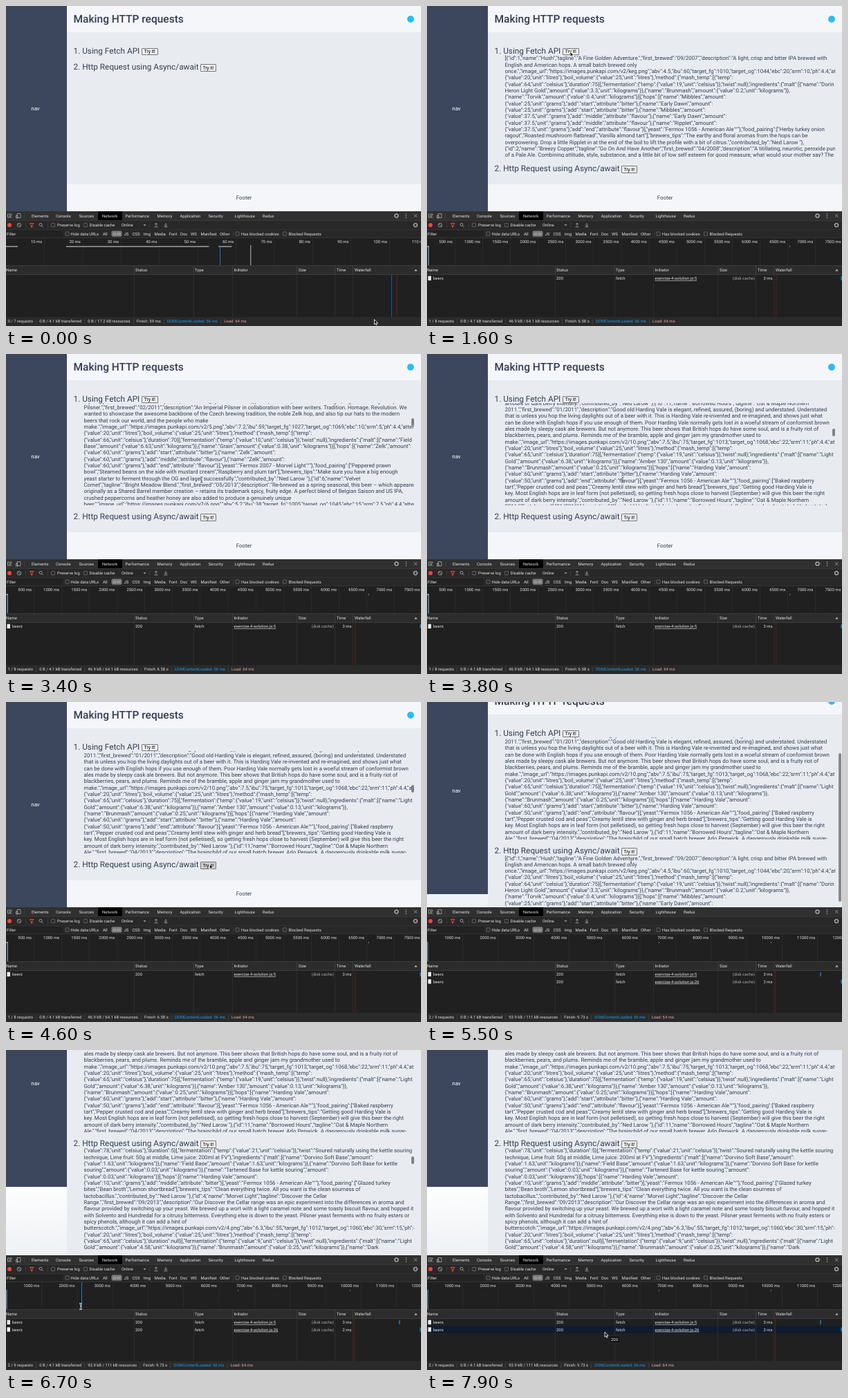
An HTML page that plays this animation: 600x463 px, repeating every 8 s.

```html
<!DOCTYPE html>
<html lang="en">
<head>
<meta charset="utf-8">
<title>Making HTTP requests</title>
<style>
html, body { margin: 0; width: 100%; height: 100%; overflow: hidden; background: #222; }
#stage { position: relative; width: 600px; height: 463px; overflow: hidden; font-family: Roboto, sans-serif; text-rendering: geometricPrecision; }
#stage div, #stage svg, button { position: absolute; }
#page { width: 600px; height: 297px; overflow: hidden; background: linear-gradient(#fff 190px, #eef1f5 297px); color: #333c52; font-size: 7.87px; }
#doc { width: 600px; height: 397px; }
#nav { width: 88px; height: 297.5px; line-height: 297px; text-align: center; text-indent: -3px; background: #3c475e; color: #fff; }
#head { left: 88px; width: 512px; height: 38px; background: #f5f6fa; }
#title { left: 97.5px; top: 9px; font: 500 15.5px/20px Roboto, sans-serif; }
#dot { left: 580px; top: 14px; width: 10px; height: 10px; border-radius: 50%; background: #2bbcf7; }
#main { left: 88px; top: 38px; width: 512px; height: 220px; background: #e8ecf1; }
#foot { left: 88px; top: 258px; width: 512px; height: 39px; line-height: 39px; text-align: center; background: #f5f6fa; }
.item { left: 97.5px; top: 57.6px; font-size: 11.8px; line-height: 14px; white-space: pre; }
button { box-sizing: border-box; width: 23.5px; height: 10.5px; padding: 0; border: 1px solid #767676; border-radius: 1px; background: #efefef; color: #000; font: 6.5px/8px "Liberation Sans", Arial, sans-serif; }
.out { left: 112.5px; top: 71.3px; width: 477.5px; height: 147.5px; overflow: hidden; display: none; }
.out div { white-space: pre; line-height: 9.33px; }
.thumb { left: 585.5px; width: 4px; height: 11px; border-radius: 2px; background: #7f8287; }
#pageThumb { left: 595px; top: 74px; width: 4px; height: 215px; border-radius: 2px; background: #86898e; }
.status { top: 450px; left: 0; width: 600px; height: 13px; display: flex; align-items: center; background: #2a2a2a; color: #ddd; font-size: 5.95px; white-space: nowrap; }
.status span { padding: 0 4.2px 0 4px; border-right: .5px solid #3c3c3c; }
.status span:first-child { padding-left: 2.5px; }
.status span:last-child { border: 0; }
svg text { font: 5.95px Roboto, sans-serif; fill: #e2e2e2; }
</style>
</head>
<body>
<div id="stage">
  <div id="page">
    <div id="doc">
      <div id="nav">nav</div>
      <div id="head"></div>
      <div id="title">Making HTTP requests</div>
      <div id="dot"></div>
      <div id="main"></div>
      <div id="foot">Footer</div>
      <div class="item">1. Using Fetch API</div>
      <button style="left:196px;top:60.8px">Try it!</button>
      <div class="out"><div></div></div>
      <div id="second" style="top:0;left:0">
        <div class="item" style="top:81px">2. Http Request using Async/await</div>
        <button style="left:280.7px;top:84.4px">Try it!</button>
        <div class="out" style="top:94.5px"><div></div></div>
        <div class="thumb"></div>
      </div>
      <div class="thumb" id="thumb1"></div>
    </div>
    <div id="pageThumb"></div>
  </div>
  <svg id="tools" width="600" height="463"></svg>
  <div id="statuses"></div>
  <svg id="pointer" width="600" height="463"></svg>
</div>
<script>
const $ = s => document.querySelector(s), $$ = s => [...document.querySelectorAll(s)];

// Response text, already broken into lines
const LINE = 9.33, VIEW = 147.5, TOTAL = 375;
const temp = n => `{"value":${n},"unit":"celsius"}`;
const grams = (n, part, use) => `{"value":${n},"unit":"grams"},"add":"${part}","attribute":"${use}"}`;
const kilos = n => `{"value":${n},"unit":"kilograms"}}`;
const image = (word, file, abv, ibu, fg, og, ebc, srm) => `${word}.","image_url":"https://images.punkapi.com/v2/${file}.png","abv":${abv},"ibu":${ibu},"target_fg":${fg},"target_og":${og},"ebc":${ebc},"srm":${srm},"ph":4.4,"attenuation_level":75,"volume":`;
const volume = '{"value":20,"unit":"litres"},"boil_volume":{"value":25,"unit":"litres"},"method":{"mash_temp":[{"temp":';
const mash = (a, time, b, malt) => `${temp(a)},"duration":${time}}],"fermentation":{"temp":${temp(b)}},"twist":null},"ingredients":{"malt":[{"name":"${malt}`;
const next = hop => `,{"name":"${hop}","amount":`;
const by = '"contributed_by":"Ned Larow "},';

const blocks = {
  0: [
    '[{"id":1,"name":"Hush","tagline":"A Fine Golden Adventure.","first_brewed":"09/2007","description":"A light, crisp and bitter IPA brewed with',
    'English and American hops. A small batch brewed only',
    image('once', 'keg', 4.5, 60, 1010, 1044, 20, 10),
    volume,
    mash(64, 75, 19, 'Dorin'),
    `Heron Light Gold","amount":${kilos(3.3)},{"name":"Brunmash","amount":${kilos(0.2)},`,
    `{"name":"Torvik","amount":${kilos(0.4)}],"hops":[{"name":"Mibbles","amount":`,
    grams(25, 'start', 'bitter') + next('Early Dawn'),
    grams(25, 'start', 'bitter') + next('Mibbles'),
    grams(37.5, 'middle', 'flavour') + next('Early Dawn'),
    grams(37.5, 'middle', 'flavour') + next('Ripplet'),
    grams(37.5, 'end', 'flavour') + '],"yeast":"Fermox 1056 - American Ale™"},"food_pairing":["Herby turkey onion',
    'ragout","Roasted mushroom flatbread","Vanilla almond tart"],"brewers_tips":"The earthy and floral aromas from the hops can be',
    'overpowering. Drop a little Ripplet in at the end of the boil to lift the profile with a bit of citrus.",' + by,
    '{"id":2,"name":"Breezy Copper","tagline":"Go On And Have Another","first_brewed":"04/2008","description":"A titillating, neurotic, peroxide punk',
    'of a Pale Ale. Combining attitude, style, substance, and a little bit of low self esteem for good measure; what would your mother say? The',
    'seductive lure of the sassy passion fruit hop proves too much to resist. All that is even before we get onto the fact that there are no',
    'additives, preservatives, pasteurization or strings attached. All wrapped up with the customary MaltElk bite and imaginative',
    'twist.'],
  33: [
    `${temp(78)},"duration":5}],"fermentation":{"temp":${temp(21)}},"twist":"Soured naturally using the kettle souring`,
    'technique, Lime fruit: 50g at middle, Lime juice: 200ml at FV"},"ingredients":{"malt":[{"name":"Dorvino Soft Base","amount":',
    `${kilos(1.63)},{"name":"Field Base","amount":${kilos(1.63)},{"name":"Dorvino Soft Base for kettle`,
    `souring","amount":${kilos(0.03)},{"name":"Tartened Base for kettle souring","amount":`,
    `${kilos(0.03)}],"hops":[{"name":"Harding Vale","amount":`,
    grams(10, 'middle', 'bitter') + '],"yeast":"Fermox 1056 - American Ale™"},"food_pairing":["Glazed turkey',
    'bites","Bean broth","Lemon shortbread"],"brewers_tips":"Clean everything twice. All you want is the clean sourness of',
    'lactobacillus.",' + by + '{"id":4,"name":"Morvel Light","tagline":"Discover the Cellar',
    'Range.","first_brewed":"09/2013","description":"Our Discover the Cellar range was an epic experiment into the differences in aroma and',
    'flavour provided by switching up your yeast. We brewed up a wort with a light caramel note and some toasty biscuit flavour, and hopped it',
    'with Solvento and Hundredal for a citrusy bitterness. Everything else is down to the yeast. Pilsner yeast ferments with no fruity esters or',
    'spicy phenols, although it can add a hint of',
    image('butterscotch', 4, 6.3, 55, 1012, 1060, 30, 15),
    volume,
    mash(65, null, 9, 'Light'),
    `Gold","amount":${kilos(4.58)},{"name":"Brunmash","amount":${kilos(0.25)},{"name":"Dark`],
  56: [
    'layered profile from the malt and yeast.",' + by + '{"id":5,"name":"Quiet Harbour Bridge","tagline":"Stronger Imperial',
    'Pilsner.","first_brewed":"02/2011","description":"An Imperial Pilsner in collaboration with beer writers. Tradition. Homage. Revolution. We',
    'wanted to showcase the awesome backbone of the Czech brewing tradition, the noble Zelk hop, and also tip our hats to the modern',
    'beers that rock our world, and the people who make',
    image('make', 5, 7.2, 59, 1027, 1069, 10, 5),
    volume,
    mash(66, 70, 10, 'Field'),
    `Base","amount":${kilos(6.63)},{"name":"Grain","amount":${kilos(0.38)}],"hops":[{"name":"Zelk","amount":`,
    grams(60, 'start', 'bitter') + next('Zelk'),
    grams(60, 'middle', 'flavour') + next('Zelk'),
    grams(60, 'end', 'flavour') + '],"yeast":"Fermox 2007 - Morvel Light™"},"food_pairing":["Peppered prawn',
    'bowl","Steamed beans on the side with mustard cream","Raspberry and plum tart"],"brewers_tips":"Make sure you have a big enough',
    'yeast starter to ferment through the OG and lager successfully.",' + by + '{"id":6,"name":"Velvet',
    'Comet","tagline":"Bright Meadow Blend.","first_brewed":"05/2013","description":"Re-brewed as a spring seasonal, this beer – which appeared',
    'originally as a Shared Barrel member creation – retains its trademark spicy, fruity edge. A perfect blend of Belgian Saison and US IPA,',
    'crushed peppercorns and heather honey are also added to produce a genuinely unique',
    image('beer', 6, 5.2, 38, 1005, 1045, 15, 7.5)],
  127: [
    '2011.","first_brewed":"01/2011","description":"Good old Harding Vale is elegant, refined, assured, (boring) and understated. Understated',
    'that is unless you hop the living daylights out of a beer with it. This is Harding Vale re-invented and re-imagined, and shows just what',
    'can be done with English hops if you use enough of them. Poor Harding Vale normally gets lost in a woeful stream of conformist brown',
    'ales made by sleepy cask ale brewers. But not anymore. This beer shows that British hops do have some soul, and is a fruity riot of',
    'blackberries, pears, and plums. Reminds me of the bramble, apple and ginger jam my grandmother used to',
    image('make', 10, 7.5, 75, 1013, 1068, 22, 11),
    volume,
    mash(65, 75, 19, 'Light'),
    `Gold","amount":${kilos(6.38)},{"name":"Amber 130","amount":${kilos(0.13)},`,
    `{"name":"Brunmash","amount":${kilos(0.25)}],"hops":[{"name":"Harding Vale","amount":`,
    grams(60, 'start', 'bitter') + next('Harding Vale'),
    grams(50, 'end', 'flavour') + '],"yeast":"Fermox 1056 - American Ale™"},"food_pairing":["Baked raspberry',
    'tart","Pepper crusted cod and peas","Creamy lentil stew with ginger and herb bread"],"brewers_tips":"Getting good Harding Vale is',
    'key. Most English hops are in leaf form (not pelletised), so getting fresh hops close to harvest (September) will give this beer the right',
    'amount of dark berry intensity.",' + by + '{"id":11,"name":"Borrowed Hours","tagline":"Oat & Maple Northern',
    'Ale.","first_brewed":"04/2013","description":"The brainchild of our small batch brewer, Arlo Penwick. A dangerously drinkable milk sugar-']
};
const lines = [];
for (const at in blocks) blocks[at].forEach((line, i) => lines[+at + i] = line);
const filler = blocks[127].slice(0, 15);
for (let i = 0; i < TOTAL; i++) lines[i] ??= filler[(i - 127 + 150) % 15];
const outs = $$('.out');
outs.forEach(out => out.firstElementChild.textContent = lines.join('\n'));

// Developer tools
const text = (x, y, s, attr = '') => `<text x="${x}" y="${y + 2.1}" ${attr}>${s}</text>`;
const rect = (x, y, w, h, fill) => `<rect x="${x}" y="${y}" width="${w}" height="${h}" fill="${fill}"/>`;
const path = (d, color = '#aaa', width = .8) => `<path d="${d}" fill="none" stroke="${color}" stroke-width="${width}"/>`;
const ring = (x, y, r, color = '#aaa', width = .8) => `<circle cx="${x}" cy="${y}" r="${r}" fill="none" stroke="${color}" stroke-width="${width}"/>`;
const labels = (list, y) => Object.entries(list).map(([s, x]) => text(x, y, s)).join('');
const check = (x, y) => `<rect x="${x - 2.6}" y="${y - 2.6}" width="5.2" height="5.2" rx=".8" fill="#2a2a2a" stroke="#888" stroke-width=".6"/>`;
const gear = (x, y) => ring(x, y, 2.4, '#aaa', 1.3) + ring(x, y, 3.3, '#aaa', .7).replace('/>', ' stroke-dasharray="1.1 1.5"/>');
const separators = (xs, y) => xs.map(x => rect(x, y - 4, .6, 8, '#484848')).join('');

const frame = rect(0, 297, 600, 166, '#202020') + rect(0, 297, 600, 13, '#303030') + rect(0, 310, 600, 26, '#282828')
  + rect(0, 310, 600, .5, '#484848') + rect(0, 323, 600, .5, '#3a3a3a') + rect(0, 335, 600, .5, '#3f3f3f')
  + rect(133, 297, 35, 13, '#000')
  + labels({ Elements: 37, Console: 72, Sources: 105.5, Network: 139, Performance: 172.5, Memory: 218.5, Application: 251.5, Security: 292.5, Lighthouse: 330.5, Redux: 371 }, 303.5)
  + path('M7 306H2.5V301H8V303M5 303L8.5 306.5M5 303V305.5M5 303H7.5') + path('M16 300.5H21V306.5H16ZM14.5 303H17V307H14.5Z')
  + separators([26], 303.5) + gear(564.5, 303.5)
  + [300.8, 303.5, 306.2].map(y => `<circle cx="578.5" cy="${y}" r=".8" fill="#aaa"/>`).join('')
  + path('M590 301.3L594.4 305.7M594.4 301.3L590 305.7')
  + '<circle cx="5" cy="317" r="3" fill="#f0443c"/>' + ring(19, 317, 2.8) + path('M17 315L21 319')
  + path('M34.3 314.5H40L38 317V320H36.4V317Z', '#f0443c', 1) + ring(50, 316.3, 2) + path('M51.5 317.8L53.6 320')
  + separators([28, 60, 207.5], 317) + check(68, 317) + check(115, 317)
  + labels({ 'Preserve log': 74, 'Disable cache': 120.5, Online: 167 }, 317)
  + '<path d="M198.5 316h4l-2 2.6z" fill="#999"/>'
  + path('M217 318.5V314M215 316L217 314L219 316M214.5 319.7H219.5M231 314V318.5M229 316.5L231 318.5L233 316.5M228.5 319.7H233.5') + gear(592, 317)
  + rect(0, 325, 82, 9.5, '#222') + text(1, 329.5, 'Filter') + check(88.5, 329.5) + check(334.5, 329.5) + check(403, 329.5)
  + '<rect x="152.5" y="325.3" width="15" height="8.4" rx="2" fill="#777"/>' + text(154.3, 329.5, 'XHR', 'style="fill:#bbb"')
  + labels({ 'Hide data URLs': 93.5, All: 140, JS: 170.5, CSS: 182.5, Img: 199, Media: 214.5, Font: 235.5, Doc: 252, WS: 267, Manifest: 281.5, Other: 309, 'Has blocked cookies': 340, 'Blocked Requests': 408.5 }, 329.5)
  + separators([328.5], 329.5);

const columns = [185, 271, 327, 420, 475, 501.5];
const table = rect(0, 375.5, 600, 13, '#2c2c2c') + rect(0, 375.5, 600, .6, '#4a4a4a') + rect(0, 388, 600, .6, '#4a4a4a')
  + labels({ Name: 0, Status: 187, Type: 273, Initiator: 329.5, Size: 423, Time: 478, Waterfall: 504 }, 382)
  + '<path d="M590.5 383.5h4l-2 -3z" fill="#bbb"/>'
  + columns.map(x => rect(x, 376, .6, 12.5, '#4a4a4a') + rect(x, 388.5, .6, 61.5, '#383838')).join('');

const row = (y, line, time, tick) => rect(1.5, y - 3.3, 4.5, 6.4, '#eee')
  + labels({ beers: 9, 200: 187, fetch: 273, [`${time} ms`]: 486.5 }, y)
  + text(329.5, y, `exercise-4-solution.js:${line}`, 'text-decoration="underline"')
  + text(474, y, '(disk cache)', 'text-anchor="end" style="fill:#aaa"') + rect(tick, y - 3, 1.3, 6, '#1592d6');

const phases = [
  { unit: 10, step: 55.4, status: ['0 / 7 requests', '0 B / 4.1 kB transferred', '0 B / 17.2 kB resources', 'Finish: 59 ms'],
    marks: rect(0, 347.5, 17, 1, '#ddd') + rect(87, 347.5, 206.5, 1, '#ddd') + rect(307, 347.5, 19.5, 1, '#ddd')
      + rect(309, 347, 1, 28, '#1b78c8') + rect(353.3, 346, 1, 29, '#bdb3b3'),
    rows: rect(557, 389, 1, 61, '#1a559c') + rect(564.7, 389, .8, 61, '#74201e') },
  { unit: 500, step: 40.1, status: ['1 / 8 requests', '0 B / 4.1 kB transferred', '46.9 kB / 64.1 kB resources', 'Finish: 6.58 s'],
    marks: rect(0, 347.5, 3, 1, '#ddd') + rect(1.6, 347, 1.2, 28, '#86a5c4') + rect(524, 347.5, 1, 1, '#ddd'),
    rows: rect(504.5, 389, .8, 61, '#74201e') + row(394, 5, 3, 598.5) },
  { unit: 1000, step: 51.3, status: ['2 / 9 requests', '0 B / 4.1 kB transferred', '93.9 kB / 111 kB resources', 'Finish: 9.73 s'],
    marks: rect(.5, 347, 1, 28, '#86a5c4') + rect(335, 347.5, 1, 1, '#ddd') + rect(497, 347.5, 1, 1, '#ddd'),
    rows: rect(503.3, 389, .8, 61, '#74201e') + row(394, 5, 3, 568.3) + row(404.5, 26, 2, 598.5) }
];
const overview = ({ unit, step, marks }) => Array.from({ length: 15 }, (_, i) => i + 1).map(i =>
  rect(i * step, 336, .5, 39.5, '#343434') + text(i * step - 3, 341, `${i * unit} ms`, 'text-anchor="end"')).join('') + marks;

$('#tools').innerHTML = frame + `<g id="hover">${rect(0, 399.4, 600, 10.2, '#0e1c30')}</g>` + table
  + phases.map(p => `<g class="phase">${overview(p)}${p.rows}</g>`).join('')
  + `<g id="guide">${rect(0, 336, 1, 39.5, '#1f78c1')}</g>`;
$('#statuses').innerHTML = phases.map(p => `<div class="status">${p.status.map(s => `<span>${s}</span>`).join('')}`
  + '<span style="color:#1e9be8">DOMContentLoaded: 56 ms</span><span style="color:#e5a9a6">Load: 64 ms</span></div>').join('');
$('#pointer').innerHTML = `<g id="tip"><rect x="263" y="413.5" width="16" height="11" rx="1.5" fill="#161616" stroke="#3a3a3a" stroke-width=".5"/>${text(266, 419, '200')}</g>`
  + '<path id="arrow" d="M0 0V7.2L1.7 5.7L2.8 8.2L4 7.7L2.9 5.3H5.1Z" fill="#111" stroke="#fff" stroke-width=".8"/>'
  + '<g id="beam">' + ['#fff', '#222'].map((c, i) => path('M-1.8 -4.3Q0 -4.3 0 -3V3Q0 4.3 -1.8 4.3M1.8 -4.3Q0 -4.3 0 -3M0 3Q0 4.3 1.8 4.3M-1 1.8H1', c, 1.7 - i)).join('') + '</g>';

// Motion tables: [time, ...values]
const cursorKeys = [[0, 532.5, 453.5], [700, 207, 66], [1700, 207, 66], [2600, 282.5, 182], [4200, 283, 182], [4600, 294.5, 234.5],
  [5000, 294.5, 234.5], [5400, 295, 230], [6400, 295, 230], [6700, 108, 371], [6900, 108, 371], [7400, 257, 408]];
const firstKeys = [[2800, 0], [2900, 19.5], [3400, 529.8], [3800, 900], [4200, 1183.3]];
const secondKeys = [[5900, 0], [6000, 25], [6300, 250], [6500, 308]];
const pageKeys = [[5400, 0], [5500, 20], [5800, 100]];
const smooth = u => u * u * (3 - 2 * u), linear = u => u;

function sample(keys, t, ease = linear) {
  const i = keys.findIndex(k => k[0] > t);
  if (i < 1) return keys.at(i).slice(1);
  const [a, b] = [keys[i - 1], keys[i]], u = ease((t - a[0]) / (b[0] - a[0]));
  return a.slice(1).map((v, n) => v + (b[n + 1] - v) * u);
}
const show = (el, on) => el.style.display = on ? '' : 'none';
const within = (t, a, b) => t >= a && t < b;

const buttons = $$('button'), groups = $$('.phase'), statuses = $$('.status'), thumbs = [$('#thumb1'), $('#second .thumb')];
const limit = TOTAL * LINE - VIEW;

function render(t) {
  const phase = t < 900 ? 0 : t < 4800 ? 1 : 2;
  const [x, y] = sample(cursorKeys, t, smooth);
  const beam = within(t, 2700, 4300) || within(t, 5400, 7000);

  groups.forEach((g, i) => show(g, i === phase));
  statuses.forEach((s, i) => show(s, i === phase));
  show($('#foot'), phase < 2);
  $('#main').style.height = phase < 2 ? '220px' : '359px';
  $('#second').style.transform = `translateY(${phase ? 147 : 0}px)`;
  $('#doc').style.transform = `translateY(${-sample(pageKeys, t)[0]}px)`;
  show($('#pageThumb'), within(t, 5500, 6300));

  const scrolls = [sample(firstKeys, t)[0], sample(secondKeys, t)[0]];
  const fades = [within(t, 2900, 5000), within(t, 6000, 7300)];
  outs.forEach((out, i) => {
    out.style.display = phase > i ? 'block' : 'none';
    out.firstElementChild.style.transform = `translateY(${-scrolls[i]}px)`;
    thumbs[i].style.top = [71.8, 94.8][i] + scrolls[i] / limit * (VIEW - 12) + 'px';
    show(thumbs[i], fades[i]);
  });
  buttons[0].style.background = within(t, 700, 1000) ? '#d2d2d2' : '#efefef';
  buttons[1].style.background = within(t, 4500, 4900) ? '#cfcfcf' : '#efefef';

  show($('#arrow'), !beam);
  show($('#beam'), beam);
  for (const id of ['#arrow', '#beam']) $(id).setAttribute('transform', `translate(${x} ${y})`);
  show($('#guide'), within(y, 336, 375.5));
  $('#guide').setAttribute('transform', `translate(${x + 1} 0)`);
  show($('#hover'), phase === 2 && within(y, 399.4, 409.6));
  show($('#tip'), t >= 7800);
}

const start = performance.now();
(function tick() {
  const t = (performance.now() - start) % 8000;
  render(Math.floor(t / 100) * 100);
  requestAnimationFrame(tick);
})();
</script>
</body>
</html>
```
